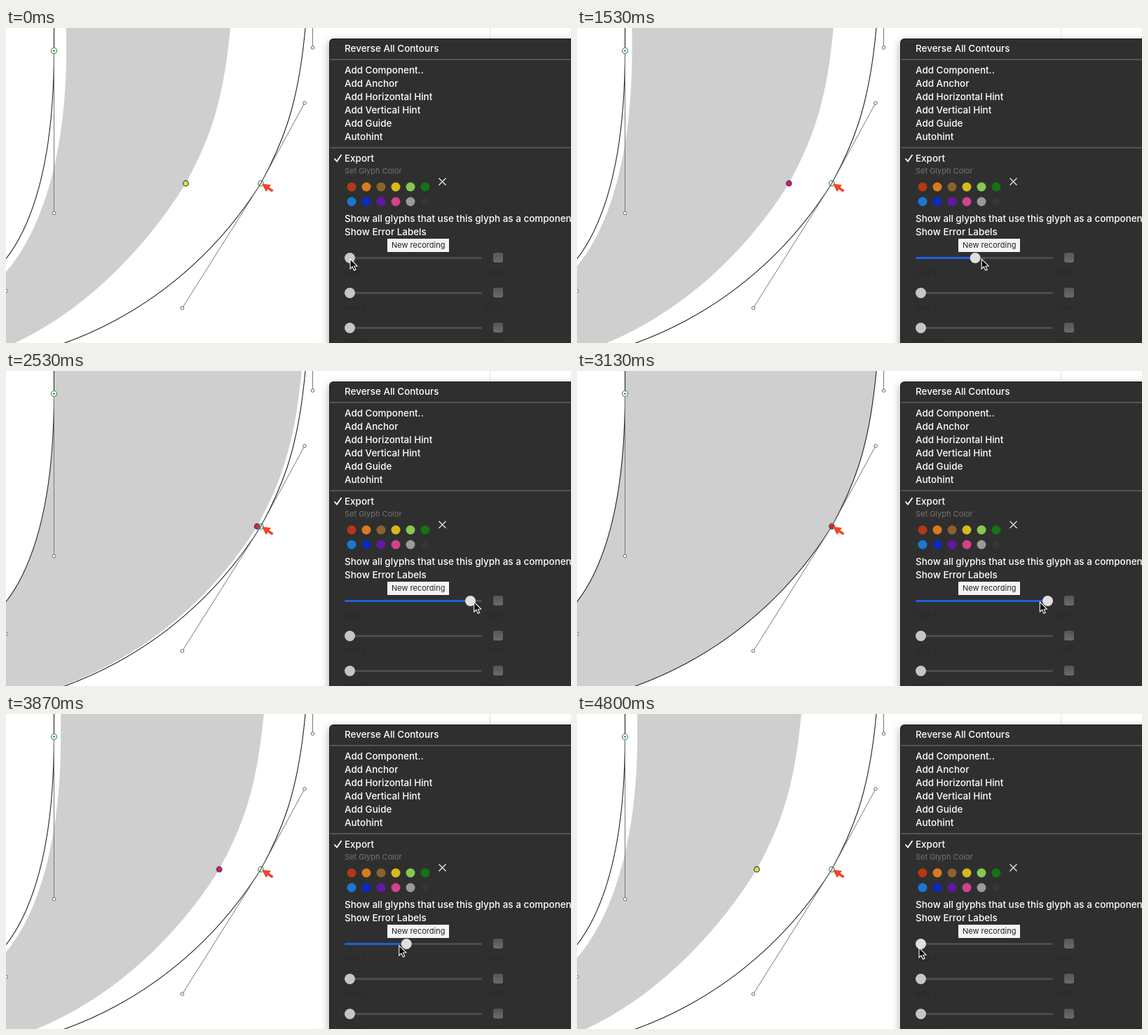
These frames come from a looping animation (806 px wide and 450 px high, 4.87 s). An HTML page with a canvas:

```html
<!DOCTYPE html>
<html>
<head>
<meta charset="utf-8">
<style>
html, body { margin: 0; height: 100%; overflow: hidden; background: #fff }
canvas { display: block; width: 806px; height: 450px }
</style>
</head>
<body>
<canvas id="stage"></canvas>
<script>
const LOOP = 4870;
const LEAD = 80; // ms by which the pointer runs ahead of the knob
const KNOB_X = 490.5, TRAVEL = 181;

const canvas = document.getElementById('stage');
const ratio = window.devicePixelRatio || 1;
canvas.width = 806 * ratio;
canvas.height = 450 * ratio;
const ctx = canvas.getContext('2d');
ctx.scale(ratio, ratio);

const clamp = n => Math.min(1, Math.max(0, n));
const rise = t => clamp((t - 600) / 2100);
const fall = t => clamp((t - 3130) / 1600);

// Slider value: a half-smoothed drag up, then a quicker drag back
function sliderValue(t) {
  if (t > 3000) return (1 - fall(t)) ** 1.3;
  const u = rise(t);
  return (u + u * u * (3 - 2 * u)) / 2;
}

// The picture advances at 15 steps a second, on a 10 ms clock
function stepTime(t) {
  const r = t % 200;
  return t - r + (r < 70 ? 0 : r < 130 ? 70 : 130);
}

// Bezier points of the bold outline for a given slider value
const outer = v => {
  const s = 1 - v, x = -107 * s;
  return [[437 + x, -382], [437 + x, 28], [426 + x, 107], [363.5 + x, 222],
    [252 - 95 * s, 400 - 19 * s], [70 - 59 * s, 480], [-83 - 30 * s, 480]];
};
const inner = v => {
  const s = 1 - v, x = 68.5 + 17.5 * s, y = 375 + 18 * s;
  return [[-83, y], [0, y], [x, 264.5], [x, 32.5]];
};

function paint(fill, stroke, width = 1) {
  if (fill) { ctx.fillStyle = fill; ctx.fill(); }
  if (stroke) { ctx.strokeStyle = stroke; ctx.lineWidth = width; ctx.stroke(); }
}

function circle(x, y, r, fill, stroke, width) {
  ctx.beginPath();
  ctx.arc(x, y, r, 0, 7);
  paint(fill, stroke, width);
}

function poly(points, fill, stroke, width) {
  ctx.beginPath();
  points.forEach(p => ctx.lineTo(...p));
  if (fill) ctx.closePath();
  paint(fill, stroke, width);
}

function box(x, y, w, h, r, fill) {
  ctx.beginPath();
  ctx.roundRect(x, y, w, h, r);
  paint(fill);
}

function label(text, x, y, color = '#fff', font = '500 13.45px') {
  ctx.font = font + ' Inter, sans-serif';
  ctx.fillStyle = color;
  ctx.fillText(text, x, y);
}

function curves(points) {
  ctx.lineTo(...points[0]);
  for (let i = 1; i < points.length; i += 3)
    ctx.bezierCurveTo(...points.slice(i, i + 3).flat());
}

function drawGlyph(v) {
  ctx.beginPath();
  curves(outer(v));
  curves(inner(v));
  ctx.lineTo(inner(v)[3][0], -382);
  paint('#cfcfcf');

  ctx.beginPath();
  curves(outer(1));
  paint(null, '#222', 1.1);
  ctx.beginPath();
  curves(inner(1));
  ctx.lineTo(68.5, -10);
  paint(null, '#222', 1.1);

  const corner = [68.5, 32.5], node = [363.5, 222];
  const handles = [[68.5, 264.5], [426, 107], [251.5, 400], [437.5, 28], [0, 375.5]];
  poly([corner, handles[0]], null, '#777');
  poly([handles[1], node, handles[2]], null, '#777');
  poly([[437.5, 0], handles[3]], null, '#777');
  handles.forEach(p => circle(...p, 2.3, '#fff', '#666'));

  circle(...corner, 4, '#fff', '#3c9150', 1.2);
  circle(...corner, 1.3, '#357a45');
  const hue = 56 * (1 - clamp(3 * v));
  circle(256.5 + 107 * v, 222, 3.8, `hsl(${hue} 85% 52%)`, v < .03 ? '#2d3a78' : '#2632c8', 1.2);
  circle(...node, 3.8, null, '#3c9150', 1.2);
  poly([[365, 222.5], [378, 224], [375.5, 227.5], [381.5, 231.5], [379.5, 234.5], [373.5, 230.5], [371, 234]], '#f0462c');
}

function drawPanel() {
  ctx.fillStyle = '#e2e2e2';
  ctx.fillRect(690, 0, 1, 15);
  ctx.save();
  ctx.shadowColor = 'rgba(0,0,0,.35)';
  ctx.shadowBlur = 12 * ratio;
  ctx.shadowOffsetY = 4 * ratio;
  box(461, 15, 380, 480, 6, '#1c1c1c');
  ctx.restore();
  box(462, 16, 380, 480, 5, '#2f2f2f');

  ctx.fillStyle = '#545454';
  ctx.fillRect(462, 44, 344, 2);
  ctx.fillRect(462, 170, 344, 2);

  label('Reverse All Contours', 483, 34);
  ['Add Component..', 'Add Anchor', 'Add Horizontal Hint', 'Add Vertical Hint', 'Add Guide', 'Autohint']
    .forEach((text, i) => label(text, 483, 65 + 19 * i));
  label('Export', 483, 191);
  poly([[468.5, 186.5], [472, 190.5], [478.5, 181]], null, '#fff', 1.8);
  label('Set Glyph Color', 483, 208, '#747474', '400 11px');
  ['#b33818', '#d87b20', '#8a622c', '#d6ba1b', '#86c850', '#157215',
   '#1a78d2', '#0b2bc0', '#6317a3', '#d3428b', '#9a9a9a', '#363636']
    .forEach((color, i) => circle(493 + 21 * (i % 6), i < 6 ? 227 : 248, i < 11 ? 6.5 : 5, color));
  for (const d of [-5, 5]) poly([[622.5 - d, 214.5], [622.5 + d, 224.5]], null, '#eee', 1.2);
  label('Show all glyphs that use this glyph as a component', 483, 277);
  label('Show Error Labels', 483, 296);
}

function drawSlider(row, value, color) {
  const x = KNOB_X + TRAVEL * value, y = 328.5 + 50 * row;
  box(483, y - 1.5, 196, 3, 1.5, '#4b4b4b');
  if (value) box(483, y - 1.5, x - 483, 3, 1.5, '#1f5fe0');
  circle(x, y, 7.5, color);
  const shade = ctx.createLinearGradient(0, y - 7, 0, y + 7);
  shade.addColorStop(0, '#565656');
  shade.addColorStop(1, '#6c6c6c');
  box(695, y - 7.5, 14, 14, 3, shade);
  label('Axis ' + (row + 1), 483, y + 24, '#292929', '400 11px');
  label('Sync', 684, y + 24, '#292929', '400 11px');
}

function drawCursor(x, y) {
  const shape = [[0, 0], [0, 14], [3.2, 11], [5.6, 16.2], [8, 15.2], [5.7, 10.2], [10, 10]];
  poly(shape.map(p => [x + p[0], y + p[1]]), '#000', '#fff', 1.1);
}

function draw(t) {
  const value = sliderValue(t);
  ctx.fillStyle = '#fff';
  ctx.fillRect(0, 0, 806, 450);
  drawGlyph(value);
  drawPanel();
  drawSlider(0, value, t < 130 ? '#c8c8c8' : '#e0e0e0');
  drawSlider(1, 0, '#c6c6c6');
  drawSlider(2, 0, '#c6c6c6');
  box(544, 301, 88, 19, 0, '#f4f4f4');
  label('New recording', 550, 314.3, '#222', '400 11px');
  const drift = fall(t);
  drawCursor(KNOB_X + TRAVEL * sliderValue(t + LEAD) + .5 - 3 * drift, 330 + 4 * drift ** 2);
}

function tick() {
  draw(stepTime(performance.now() % LOOP));
  requestAnimationFrame(tick);
}
tick();
</script>
</body>
</html>
```
